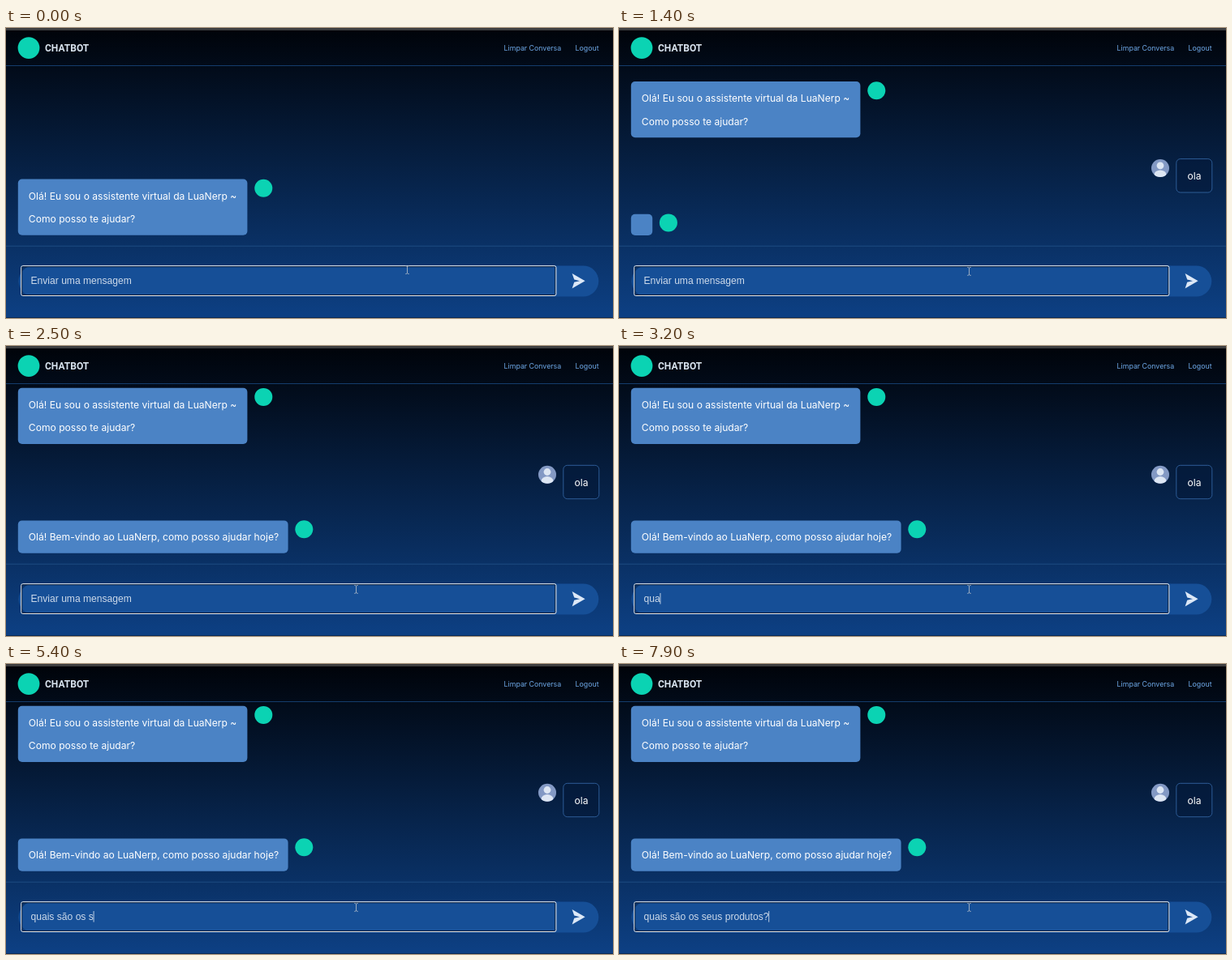
An HTML page for the animation above (8 s loop, 748x358 px).

```html
<!DOCTYPE html>
<html lang="pt">
<head>
<meta charset="utf-8">
<title>Chatbot</title>
<style>
  html, body { margin: 0; width: 100%; height: 100%; overflow: hidden; background: #000; }
  svg { display: block; width: 748px; height: 358px; }
  text { white-space: pre; font: 12.1px Inter, sans-serif; fill: #fff; }
  .brand { font: 600 12px Roboto, sans-serif; fill: #d9e3ee; }
  .link { font-size: 8.8px; fill: #6fa8e6; }
  .field { font: 12.1px "Liberation Sans", Arial, sans-serif; fill: #cddaea; }
  .bubble { fill: #4b83c5; }
  .bot { fill: #0bd3b3; }
</style>
</head>
<body>
<svg viewBox="0 0 748 358">
  <defs>
    <linearGradient id="night" x1="0" y1="0" x2="0" y2="1">
      <stop offset="0" stop-color="#000309"/>
      <stop offset="1" stop-color="#0d4084"/>
    </linearGradient>
    <clipPath id="face"><circle cx="667" cy="173" r="11"/></clipPath>
  </defs>
  <rect width="748" height="358" fill="url(#night)"/>
  <rect width="748" height="3" fill="#3d3d3f"/>
  <rect y="357" width="748" height="1" fill="#0a2a55"/>
  <rect y="46" width="748" height="1" fill="#143c6c"/>
  <rect y="268.7" width="748" height="1" fill="#1d4a82"/>

  <circle class="bot" cx="28" cy="24.6" r="13.4"/>
  <text class="brand" x="48" y="29.2">CHATBOT</text>
  <text class="link" x="613.6" y="28">Limpar Conversa</text>
  <text class="link" x="701.6" y="28">Logout</text>

  <g id="greeting">
    <rect class="bubble" x="14.8" y="186.6" width="282.6" height="69.2" rx="5"/>
    <text x="27.8" y="211.5">Olá! Eu sou o assistente virtual da LuaNerp ~</text>
    <text x="27.8" y="240.2">Como posso te ajudar?</text>
    <circle class="bot" cx="317.3" cy="197.8" r="11"/>
  </g>

  <g id="question">
    <circle cx="667" cy="173" r="11" fill="#8399c4"/>
    <g clip-path="url(#face)" fill="#dde6f3">
      <circle cx="667" cy="169.8" r="4.4"/>
      <ellipse cx="667" cy="181" rx="7.4" ry="5.6"/>
    </g>
    <rect x="686.8" y="161.6" width="44" height="41.4" rx="5" fill="#041a3b" fill-opacity=".6" stroke="#2d5c96"/>
    <text x="700.5" y="187">ola</text>
  </g>

  <g id="pending">
    <rect class="bubble" x="14.8" y="229.7" width="26.4" height="26.2" rx="5"/>
    <circle class="bot" cx="60.9" cy="240.4" r="11"/>
  </g>

  <g id="reply">
    <rect class="bubble" x="14.8" y="215.4" width="332.8" height="40.4" rx="5"/>
    <text x="27.8" y="240.2">Olá! Bem-vindo ao LuaNerp, como posso ajudar hoje?</text>
    <circle class="bot" cx="367.3" cy="226.2" r="11"/>
  </g>

  <rect x="15.5" y="293.4" width="714.8" height="38.2" rx="19.1" fill="#164f97"/>
  <rect x="19.7" y="294.7" width="657.1" height="34.8" rx="1.2" fill="none" stroke="#0a1c36"/>
  <rect x="18.7" y="293.6" width="659.2" height="36.9" rx="2" fill="none" stroke="#e6ebf1"/>
  <path d="M697.6 303L713.6 312.2L697.6 321.4L700.2 313.8L707 312.2L700.2 310.6Z" fill="#dce8f7"/>

  <text id="field" class="field" x="30.5" y="315.8"></text>
  <rect id="caret" y="305" width=".9" height="13.6" fill="#cfdcec"/>
  <path id="mouse" d="M-2.2-5Q0-5 0-3.8Q0-5 2.2-5M0-4V4M-2.2 5Q0 5 0 3.8Q0 5 2.2 5" fill="none" stroke="#a9b6c6" stroke-width=".9"/>
</svg>
<script>
const LOOP = 8000, SENT = 1400, ANSWERED = 2500, FIELD_X = 30.5;
const el = id => document.getElementById(id);
const [greeting, question, pending, reply, field, caret, mouse] =
  ["greeting", "question", "pending", "reply", "field", "caret", "mouse"].map(el);

// Each entry: time in ms, then what the field holds from that moment on.
const typing = [[0, ""]];
const say = (time, text) => typing.push([time, text]);
const spell = (start, prefix, parts) => {
  parts.forEach((part, i) => say(start + i * 100, prefix += part));
  return prefix;
};

spell(900, "", ["o", "l", "a"]);
say(SENT, "");
let line = spell(3000, "", ["q", "u", "a"]);
line = spell(3400, line, ["i", "s", " "]);
say(3800, line += "s");
line = spell(4000, line, ["ã", "o"]);
spell(4500, line, [" s", "o"]);
say(4900, line + " ");
say(5000, line);
line = spell(5100, line, [" o", "s "]);
line = spell(5400, line, ["s", "e", "u", "s", " p", "r", "o", "d", "tu"]);
say(6400, line += "os");
for (let i = 1; i <= 3; i++) say(6600 + i * 100, line.slice(0, -i));
line = line.slice(0, -4);
say(7100, line);
line = spell(7400, line, ["u", "to", "s"]);
say(7800, line + "?");

// Caret visibility while the field is empty
const blinks = [[200, 700], [1700, 2200], [2800, 3000]];

const show = (node, on) => node.setAttribute("visibility", on ? "visible" : "hidden");
const shift = (node, x, y) => node.setAttribute("transform", `translate(${x} ${y})`);

function draw(t) {
  const sent = t >= SENT, answered = t >= ANSWERED;
  const lift = answered ? -14.3 : 0;
  shift(greeting, 0, sent ? lift - 120.6 : 0);
  shift(question, 0, lift);
  show(question, sent);
  show(pending, sent && !answered);
  show(reply, answered);

  const text = typing.filter(([time]) => time <= t).pop()[1];
  field.textContent = text || "Enviar uma mensagem";
  const width = text ? field.getComputedTextLength() : 0;
  caret.setAttribute("x", FIELD_X + width - 0.2);
  show(caret, text || blinks.some(([on, off]) => t >= on && t < off));

  const move = Math.min(1, Math.floor(t / 100) / 5);
  shift(mouse, 494.5 - 63 * move, 298.6 + 1.8 * move);
}

const start = performance.now();
function tick() {
  draw((performance.now() - start) % LOOP);
  requestAnimationFrame(tick);
}
tick();
</script>
</body>
</html>
```
